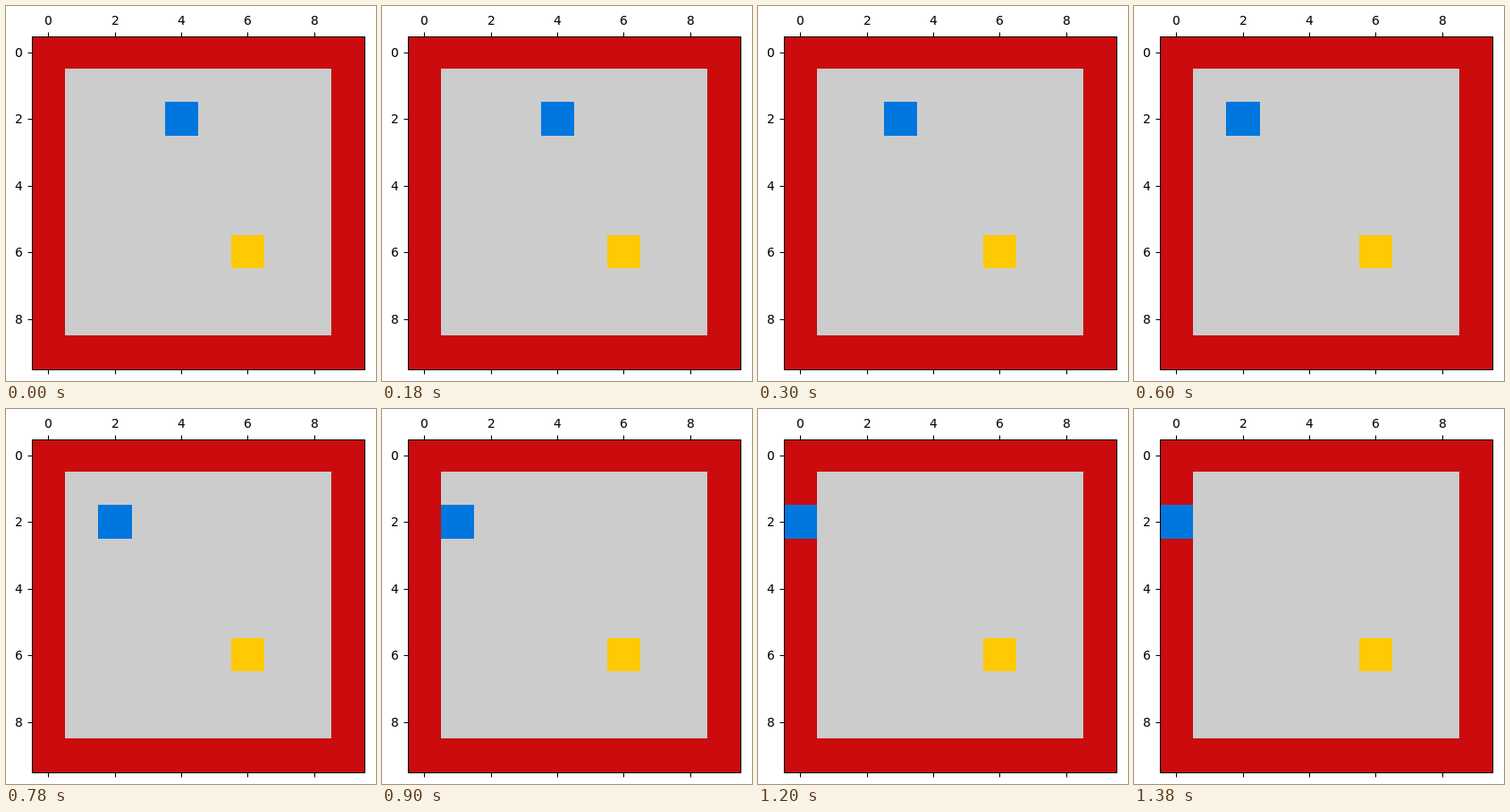
These frames come from a looping animation (414x419 px, 1500 ms). An HTML page:

```html
<!DOCTYPE html>
<html lang="en">
<head>
<meta charset="utf-8">
<title>Grid walk</title>
<style>
  html, body { margin: 0; width: 100%; height: 100%; overflow: hidden; background: #fff; }
  svg { display: block; }
  text { font: 13.89px "DejaVu Sans", sans-serif; }
</style>
</head>
<body>
<svg id="stage" width="414" height="419">
  <rect x="29" y="34" width="372" height="372" fill="#cb0b0d"/>
</svg>
<script>
const CELL = 37.2, LEFT = 29, TOP = 33, STEP_MS = 300, STEPS = 5;
const stage = document.getElementById("stage");

function add(tag, attrs, text = "") {
  const el = document.createElementNS("http://www.w3.org/2000/svg", tag);
  for (const name in attrs) el.setAttribute(name, attrs[name]);
  el.textContent = text;
  return stage.appendChild(el);
}

// Cell edges snap to whole pixels.
const edgeX = col => Math.round(LEFT + col * CELL);
const edgeY = row => Math.round(TOP + row * CELL);

function block(col, row, size, fill) {
  const x = edgeX(col), y = edgeY(row);
  return add("rect", { x, y, width: edgeX(col + size) - x, height: edgeY(row + size) - y, fill });
}

const line = d => add("path", { d, fill: "none", stroke: "#000", "stroke-width": 1.11 });

block(1, 1, 8, "#ccc");
block(6, 6, 1, "#ffc903");
const walker = block(4, 2, 1, "#0077de");

line("M29.5 34.5H401.5V406.5H29.5Z");
for (let n = 0; n < 10; n += 2) {
  const x = Math.floor(47.7 + n * CELL), y = Math.floor(52.4 + n * CELL);
  line(`M${x + 0.5} 29.5V34.5M${x + 0.5} 406.5V411.4M24.5 ${y + 0.5}H29.5`);
  add("text", { x: x - 4, y: 21 }, n);
  add("text", { x: 10, y: y + 5 }, n);
}

function draw(now) {
  const col = 4 - Math.floor(now / STEP_MS) % STEPS;
  walker.setAttribute("x", edgeX(col));
  walker.setAttribute("width", edgeX(col + 1) - edgeX(col));
  requestAnimationFrame(frame);
}

const start = performance.now();
const frame = () => draw(performance.now() - start);
frame();
</script>
</body>
</html>
```
